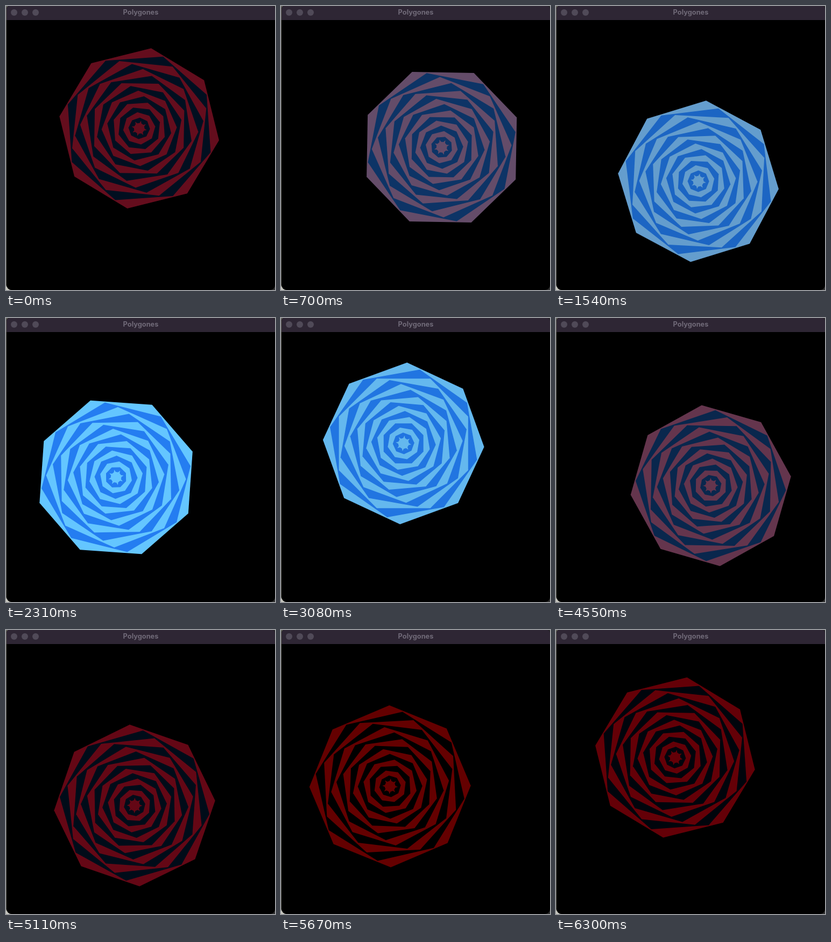
Recreate the animation shown at these times as an HTML page with a canvas. Size 500 by 526 pixels, loop 6.37 s.

```html
<!DOCTYPE html>
<html lang="fr">
<head>
<meta charset="utf-8">
<title>Polygones</title>
<style>
  html, body { margin: 0; width: 100%; height: 100%; overflow: hidden; }
  body {
    background: radial-gradient(circle at 0 100%, #c8c8c0 6px, transparent 9px),
                linear-gradient(90deg, #62625a 50%, #2c2c2c 50%);
  }
  .window {
    position: absolute; left: 1px; top: 0; width: 499px; height: 526px;
    overflow: hidden; background: #000; border-radius: 5px 5px 9px 9px;
  }
  canvas { position: absolute; left: -1px; top: 0; }
  .bar {
    position: absolute; left: 0; top: 0; width: 100%; height: 26px;
    background: #2e2634; color: #706a78;
    font: 700 12.8px/24px Inter, sans-serif; text-align: center;
  }
  .bar i {
    position: absolute; top: 6px; width: 12px; height: 12px;
    border-radius: 50%; background: #504a58;
  }
</style>
</head>
<body>
<div class="window">
  <canvas id="stage" width="500" height="526"></canvas>
  <div class="bar">
    <i style="left:8px"></i><i style="left:28px"></i><i style="left:48px"></i>
    Polygones
  </div>
</div>
<script>
const ctx = document.getElementById('stage').getContext('2d');
const STEP = 70, STEPS = 91, FPS = 15;
const SIDES = 8, LAYERS = 15, RADIUS = 150, SHRINK = 10;
const RAD = Math.PI / 180, TWIST = 10 * RAD, START = -0.819;

const channel = (base, swing, s) => Math.max(0, Math.min(255, Math.round(base + swing * s)));
const rgb = (...c) => `rgb(${c.join()})`;

function fillShape(cx, cy, points, color) {
  ctx.beginPath();
  for (const [r, a] of points) ctx.lineTo(cx + r * Math.cos(a), cy + r * Math.sin(a));
  ctx.fillStyle = color;
  ctx.fill();
}

function corners(r, turn, spiky) {
  const points = [];
  for (let i = 0; i < SIDES; i++) {
    const a = turn + i * 2 * Math.PI / SIDES;
    if (spiky) points.push([r, a - 0.17], [r + 4.5, a], [r, a + 0.17]);
    else points.push([r, a]);
  }
  return points;
}

function draw(step) {
  const time = step / FPS, t = time + START, s = Math.sin(t);
  const cx = 251 + 50 * Math.cos(2 * t), cy = 276.5 + 50 * Math.sin(2 * t);
  const turn = (8.5 + 90 * time) * RAD;
  const light = rgb(100, channel(92, 108, s), channel(125, 132, s));
  const dark = rgb(channel(16, 20, s), channel(62, 64, s), channel(121, 122, s));

  ctx.clearRect(0, 0, 500, 526);
  for (let k = 0; k < LAYERS; k++) {
    const points = corners(RADIUS - k * SHRINK, turn + k * TWIST, k === LAYERS - 1);
    fillShape(cx, cy, points, k % 2 ? dark : light);
  }
}

const begin = performance.now();
function tick() {
  const elapsed = Math.max(0, performance.now() - begin);
  draw(Math.floor(elapsed / STEP) % STEPS);
  requestAnimationFrame(tick);
}
tick();
</script>
</body>
</html>
```
